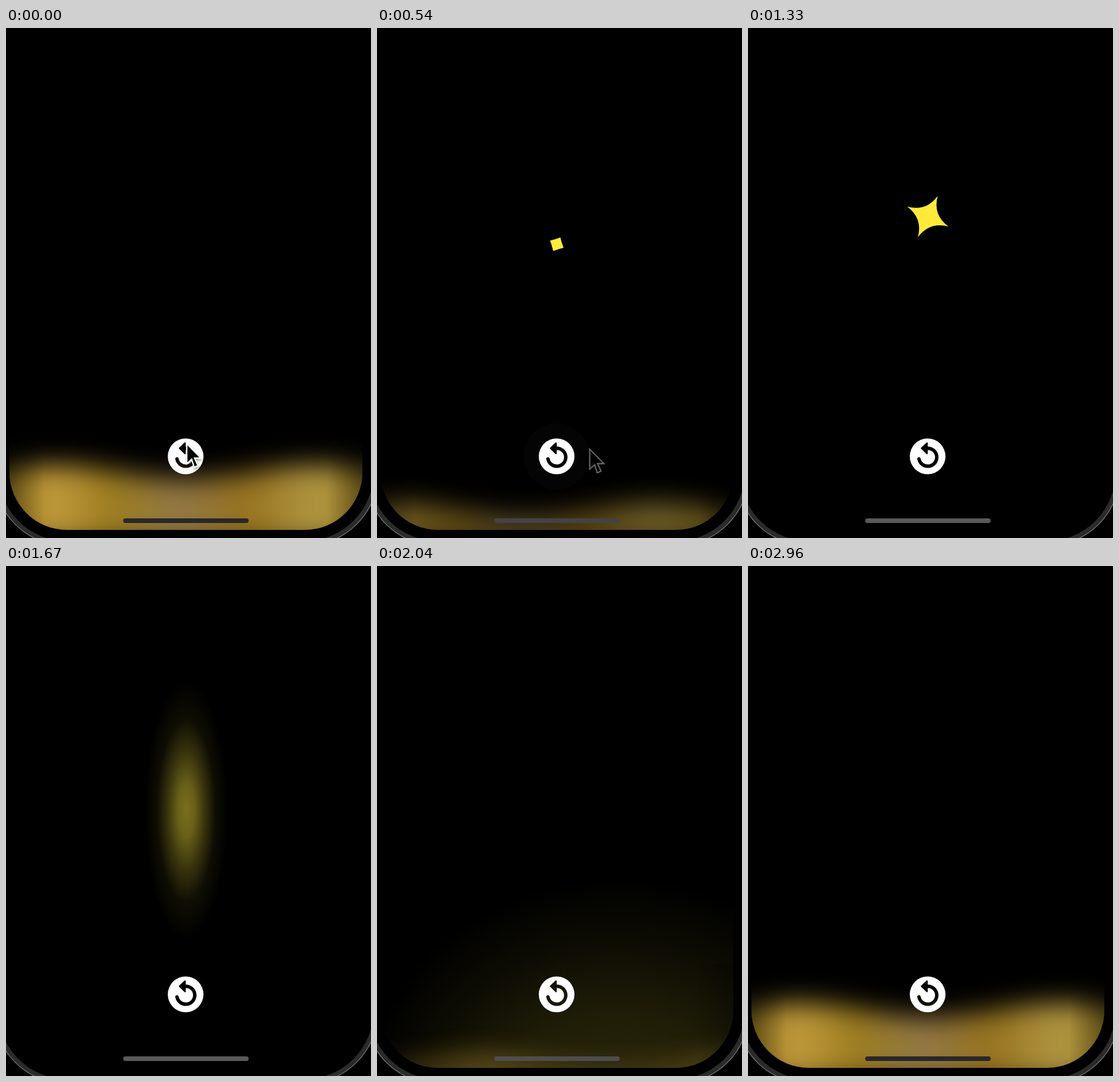
An HTML page for the animation above (3000 ms loop, 634 by 884 pixels).

```html
<!DOCTYPE html>
<html lang="en">
<head>
<meta charset="utf-8">
<title>Star burst</title>
<style>
  html, body { margin: 0; width: 100%; height: 100%; overflow: hidden; background: #000; }
  svg { display: block; }
</style>
</head>
<body>
<svg width="634" height="884" viewBox="0 0 634 884">
  <defs>
    <clipPath id="screen"><rect x="6" y="-300" width="613" height="1170" rx="100"/></clipPath>
    <filter id="soft" filterUnits="userSpaceOnUse" x="-120" y="600" width="880" height="400" color-interpolation-filters="sRGB">
      <feGaussianBlur stdDeviation="23"/>
    </filter>
    <filter id="shadow" x="-50%" y="-50%" width="200%" height="200%">
      <feDropShadow dx="1" dy="3" stdDeviation="2" flood-opacity=".35"/>
    </filter>
    <linearGradient id="hues" gradientUnits="userSpaceOnUse" x1="-100" x2="740" y1="0" y2="0">
      <stop offset="0" stop-color="#8f7544"/>
      <stop offset=".1" stop-color="#9c7c1e"/>
      <stop offset=".22" stop-color="#c09a3c"/>
      <stop offset=".335" stop-color="#9c7c1e"/>
      <stop offset=".475" stop-color="#927846"/>
      <stop offset=".615" stop-color="#96721e"/>
      <stop offset=".76" stop-color="#b09642"/>
      <stop offset=".89" stop-color="#9c7c1e"/>
      <stop offset="1" stop-color="#8f7544"/>
    </linearGradient>
    <linearGradient id="edges">
      <stop offset="0" stop-opacity=".4"/>
      <stop offset=".1" stop-opacity="0"/>
      <stop offset=".9" stop-opacity="0"/>
      <stop offset="1" stop-opacity=".4"/>
    </linearGradient>
    <radialGradient id="glow">
      <stop offset="0" stop-color="#ffe93b"/>
      <stop offset=".2" stop-color="#ffe93b" stop-opacity=".87"/>
      <stop offset=".45" stop-color="#ffe93b" stop-opacity=".47"/>
      <stop offset=".7" stop-color="#ffe93b" stop-opacity=".13"/>
      <stop offset="1" stop-color="#ffe93b" stop-opacity="0"/>
    </radialGradient>
    <radialGradient id="flash">
      <stop offset=".3" stop-color="#ffe93b" stop-opacity=".165"/>
      <stop offset=".5" stop-color="#ffe93b" stop-opacity=".135"/>
      <stop offset=".79" stop-color="#ffe93b" stop-opacity=".05"/>
      <stop offset="1" stop-color="#ffe93b" stop-opacity="0"/>
    </radialGradient>
    <mask id="cutout" maskUnits="userSpaceOnUse" x="270" y="700" width="84" height="84">
      <circle cx="312" cy="742.5" r="31" fill="#fff"/>
      <path d="M297 747A15.6 15.6 0 1 0 312 728.4" fill="none" stroke="#000" stroke-width="6" stroke-linecap="round"/>
      <path d="M301.5 728.3L311 719.5V737.5Z" stroke="#000" stroke-width="2.5" stroke-linejoin="round"/>
    </mask>
  </defs>

  <rect width="634" height="884"/>
  <g fill="none">
    <rect x="-17.75" y="-300" width="660.5" height="1193.75" rx="123.75" stroke="#2b2b2b" stroke-width="8.5"/>
    <rect x="-21.5" y="-300" width="668" height="1197.5" rx="127.5" stroke="#777" stroke-width="1.3"/>
  </g>

  <g clip-path="url(#screen)">
    <circle id="flare" cx="420" cy="1027" r="488" fill="url(#flash)"/>
    <g id="aurora">
      <path id="wave" fill="url(#hues)" filter="url(#soft)"/>
      <rect x="6" y="690" width="613" height="180" fill="url(#edges)"/>
    </g>
    <ellipse id="streak" cx="313" fill="url(#glow)"/>
    <path id="star" fill="#ffe93b"/>
  </g>

  <rect id="bar" x="203.5" y="850" width="218" height="8" rx="4"/>
  <circle id="halo" cx="312" cy="742.5" fill="#fff"/>
  <rect x="270" y="700" width="84" height="84" fill="#fff" mask="url(#cutout)"/>
  <path id="cursor" d="M0 0V34.5L8.5 27L13 41L19.5 38L13.5 25H24.5Z" stroke="#fff" stroke-width="2.3" filter="url(#shadow)"/>
</svg>

<script>
const LOOP = 3000;
const parts = Object.fromEntries([...document.querySelectorAll('[id]')].map(e => [e.id, e]));
const set = (id, attrs) => {
  for (const name in attrs) parts[id].setAttribute(name, attrs[name]);
};
const ramp = (t, from, to) => Math.min(1, Math.max(0, (t - from) / (to - from)));
const smooth = (t, from, to) => {
  const x = ramp(t, from, to);
  return x * x * (3 - 2 * x);
};
const mix = (a, b, k) => a + (b - a) * k;

function drawAurora(t) {
  const level = t < 1500 ? 1 - smooth(t, 200, 850) : smooth(t, 1860, 2400);
  const drift = -0.1 * (t < 1500 ? t : t - LOOP);
  const drop = 120 * (1 - level);
  let d = 'M-100 892';
  for (let x = -100; x <= 740; x += 20) {
    const y = 770 + drop - 12 * Math.cos(2 * Math.PI * (x - 85 - drift) / 455);
    d += `L${x} ${Math.min(892, y).toFixed(1)}`;
  }
  set('wave', { d: d + 'L740 892Z' });
  set('hues', { gradientTransform: `translate(${drift} 0)` });
  set('aurora', { opacity: level ** 0.6 });
  const grey = Math.round(mix(90, 40, level));
  set('bar', { fill: `rgb(${grey},${grey},${grey + 2})` });
}

function drawStar(t) {
  const age = Math.max(0, t - 278);
  const radius = 52 * (1 - Math.exp(-((age / 760) ** 1.15)));
  const y = 322 + 120 * Math.exp(-(t - 270) / 330);
  const waist = radius * mix(0.75, 0.22, ramp(t, 380, 1280));
  const turn = 10 + (t - 380) / 9;
  const point = (r, deg) => {
    const a = deg * Math.PI / 180;
    return `${(r * Math.sin(a)).toFixed(2)} ${(-r * Math.cos(a)).toFixed(2)}`;
  };
  let d = 'M' + point(radius, turn);
  for (let k = 0; k < 4; k++) {
    d += `Q${point(waist, turn + 45 + 90 * k)} ${point(radius, turn + 90 + 90 * k)}`;
  }
  const fall = ramp(t, 1530, 1670);
  set('star', {
    d: d + 'Z',
    transform: `translate(312.3 ${y + 60 * fall * fall}) scale(1 ${1 + fall})`,
    opacity: t > 278 ? 1 - ramp(t, 1540, 1620) : 0
  });
  set('streak', {
    cy: mix(330, 425, smooth(t, 1530, 1680)),
    rx: mix(55, 72, fall),
    ry: mix(70, 225, smooth(t, 1530, 1670)),
    opacity: ramp(t, 1530, 1600) * (1 - ramp(t, 1600, 1735))
  });
}

function drawTouch(t) {
  const spread = ramp(t, 140, 580);
  set('halo', {
    r: mix(31, 58, 1 - (1 - spread) ** 1.5),
    opacity: t < 140 ? 0 : 0.19 * (1 - spread)
  });
  const k = smooth(t, 100, 380);
  set('cursor', {
    transform: `translate(${mix(314, 369.5, k)} ${mix(720.5, 730, k)})`,
    opacity: 1 - ramp(t, 480, 580)
  });
}

function draw(t) {
  drawAurora(t);
  drawStar(t);
  drawTouch(t);
  set('flare', { opacity: ramp(t, 1760, 1980) * (1 - smooth(t, 1960, 2230) * 0.99) * (t < 2230) * 1.2 });
}

const start = performance.now();
function tick() {
  draw((performance.now() - start) % LOOP);
  requestAnimationFrame(tick);
}
draw(0);
requestAnimationFrame(tick);
</script>
</body>
</html>
```
